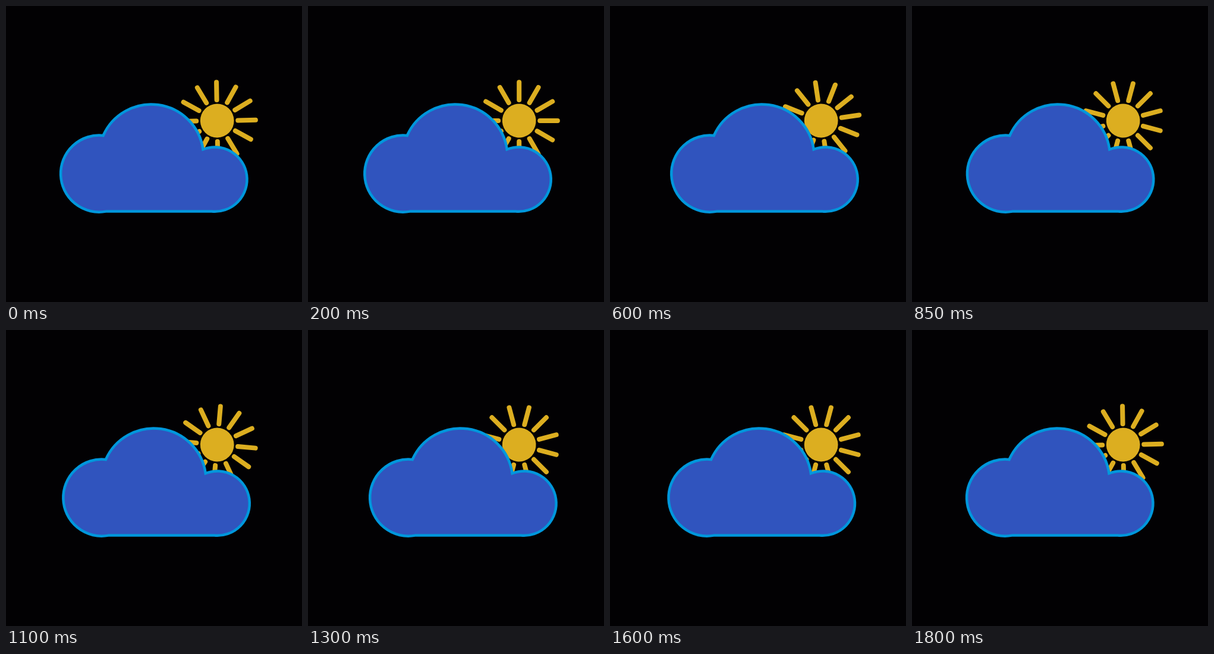
Write an HTML page that moves like this. It is 498x498 px and loops after 1.85 s.

```html
<!DOCTYPE html>
<html lang="en">
<head>
<meta charset="utf-8">
<title>Sun and cloud</title>
<style>
  html, body { margin: 0; width: 100%; height: 100%; overflow: hidden; background: #020103; }
  svg { display: block; width: 100vw; height: 100vh; }
</style>
</head>
<body>
<svg viewBox="0 0 498 498">
  <g id="sun" fill="#dcae20" stroke="#dcae20" stroke-width="8" stroke-linecap="round">
    <circle cx="355.2" cy="193" r="28.4" stroke="none"/>
  </g>
  <path id="cloud" fill="#3054be" stroke="#0097dc" stroke-width="4.5" d="
    M163.5 218
    A88.2 88.2 0 0 1 331.5 241.2
    A54.2 54.2 0 1 1 346 345.6
    H168
    A64.5 64.5 0 1 1 163.5 218 Z"/>
</svg>
<script>
const LOOP = 1850, STEP = 50, SWAY = 13;
const CENTER = { x: 355.2, y: 193 };
const sun = document.getElementById('sun');
const cloud = document.getElementById('cloud');

// Turn of the sun in degrees at a given step; the cloud sways twice per turn.
const TURN = [[0, -1], [1, 0], [4, 30], [12, 111.5], [17, 165], [26, 255], [32, 315], [36, 359]];

for (let i = 0; i < 12; i++) {
  const ray = document.createElementNS('http://www.w3.org/2000/svg', 'line');
  const { x, y } = CENTER;
  const attrs = { x1: x, x2: x, y1: y - 35, y2: y - 64.7, transform: `rotate(${i * 30} ${x} ${y})` };
  for (const name in attrs) ray.setAttribute(name, attrs[name]);
  sun.append(ray);
}

function turnAt(step) {
  const next = Math.max(1, TURN.findIndex(([s]) => s >= step));
  const [s0, a0] = TURN[next - 1], [s1, a1] = TURN[next];
  return a0 + (a1 - a0) * (step - s0) / (s1 - s0);
}

function draw(time) {
  const angle = turnAt(Math.floor(time % LOOP / STEP));
  const shift = SWAY * (1 - Math.cos(angle * Math.PI / 90)) / 2;
  sun.setAttribute('transform', `rotate(${angle} ${CENTER.x} ${CENTER.y})`);
  cloud.setAttribute('transform', `translate(${shift} 0)`);
}

const start = performance.now();
function tick() {
  draw(performance.now() - start);
  requestAnimationFrame(tick);
}
tick();
</script>
</body>
</html>
```
